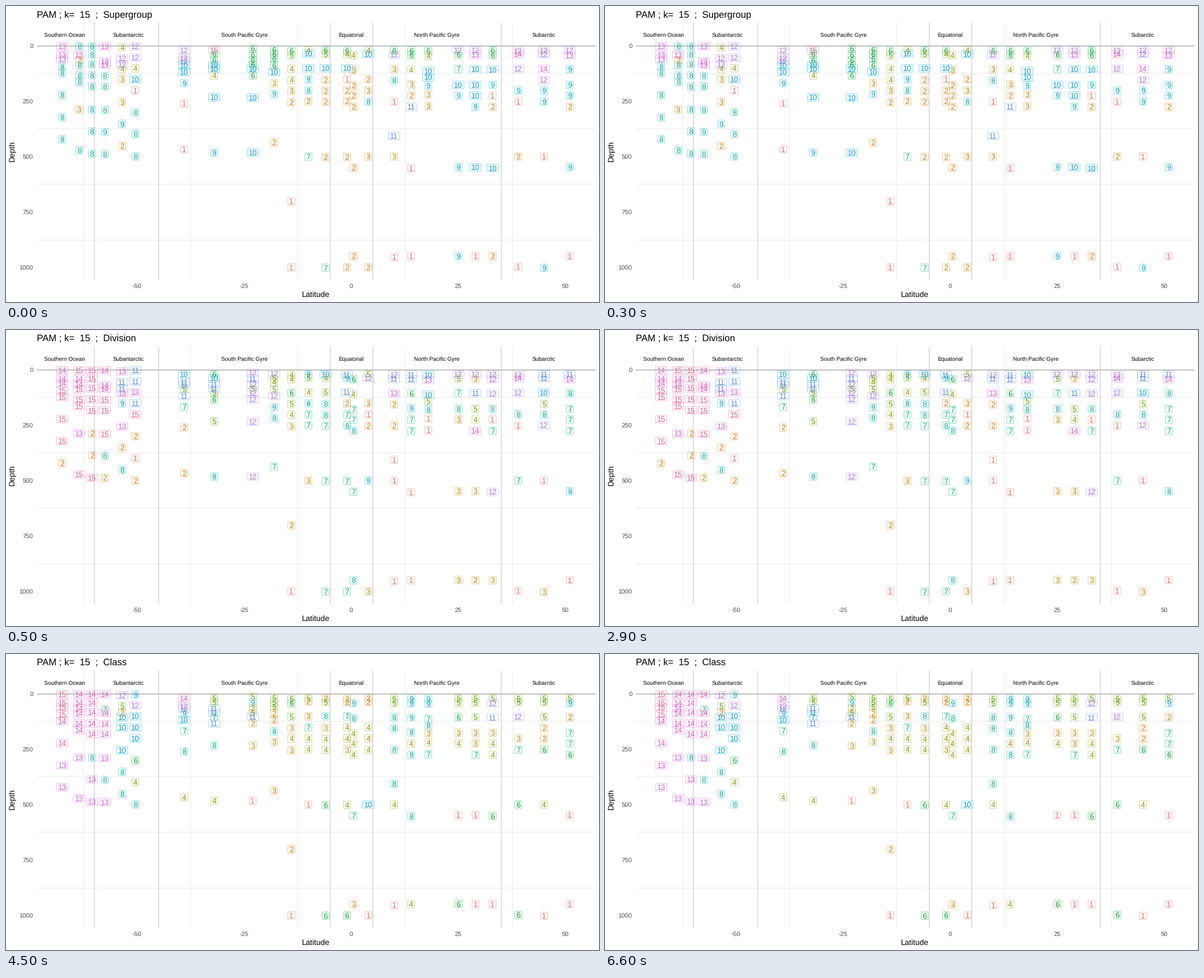
A matplotlib script for the animation above (8000 ms loop, 1058 by 529 pixels).

```python
import matplotlib.pyplot as plt
from matplotlib.animation import FuncAnimation
from matplotlib.colors import to_rgb
from matplotlib.patches import FancyBboxPatch

W, H, DPI = 1058, 529, 100
LEFT, RIGHT, TOP, BOTTOM = 55, 1051, 30, 489
LEVELS = ["Supergroup", "Division", "Class"]
HUES = ("#F8766D #E58700 #C99800 #A3A500 #6BB100 #00BA38 #00BF7D #00C0AF "
        "#00BCD8 #00B0F6 #619CFF #B983FF #E76BF3 #FD61D1 #FF67A4").split()

plt.rcParams.update({"font.family": "Liberation Sans", "text.hinting": "none"})
fig = plt.figure(figsize=(W / DPI, H / DPI), dpi=DPI, facecolor="white")
ax = fig.add_axes([0, 0, 1, 1])
ax.set(xlim=(0, W), ylim=(H, 0))
ax.axis("off")


def px(size):
    return size * 72 / DPI


def lat_x(lat):
    return 616 + 7.642 * lat


def depth_y(depth):
    return 70.5 + 0.3967 * depth


def write(x, y, s, size, color="black", ha="center"):
    """Text whose capitals are centred on y."""
    return ax.text(x, y + 0.358 * size, s, fontsize=px(size), color=color,
                   ha=ha, va="baseline")


def vline(lat, color):
    ax.plot([lat_x(lat)] * 2, [TOP, BOTTOM], color=color, lw=px(1))


def hline(depth, color):
    ax.plot([LEFT, RIGHT], [depth_y(depth)] * 2, color=color, lw=px(1))


# Grid, region borders and surface line
for d in range(125, 1000, 250):
    hline(d, "#EBEBEB")
for i in range(5):
    vline(-62.5 + 25 * i, "#EBEBEB")
for border in (-60, -45, -5, 5, 35):
    vline(border, "#C4C4C4")
hline(0, "#8C8C8C")

# Axes and region names
for d in range(0, 1001, 250):
    write(48.5, depth_y(d), str(d), 11.3, "#4D4D4D", "right")
for tick in range(-50, 51, 25):
    write(lat_x(tick), 499.5, str(tick), 11.3, "#4D4D4D")
write(553, 514.5, "Latitude", 14)
ax.text(17.5, 259, "Depth", fontsize=px(14), rotation=90,
        ha="right", va="center")
for lat, name in [(-67, "Southern Ocean"), (-52, "Subantarctic"),
                  (-25, "South Pacific Gyre"), (0, "Equatorial"),
                  (20, "North Pacific Gyre"), (45, "Subarctic")]:
    write(lat_x(lat), 51.5, name, 10)
title = write(LEFT, 14, "", 16.8, ha="left")

layers = [[], [], []]


def label(layer, x, y, cluster):
    hue = to_rgb(HUES[int(cluster) - 1])
    w, h = 4.9 + 7.6 * len(cluster), 13.4
    box = FancyBboxPatch((x - w / 2, y - h / 2), w, h,
                         boxstyle="round,pad=0,rounding_size=1.6",
                         fc="none", ec=(*hue, 0.6), lw=px(0.8))
    ax.add_patch(box)
    text = write(x, y, cluster, 13.7, [0.9 * c for c in hue])
    layer += [box, text]


def station(lat, depths, *clusters):
    """One sampling column: its depths and the clusters at each level."""
    for layer, row in zip(layers, clusters):
        for depth, cluster in zip(depths.split(), row.split()):
            label(layer, lat_x(lat), depth_y(float(depth)), cluster)


station(-67.5, "4 42 62 95 125 224 324 423",
        "13 13 13 8 8 8 8 8",
        "14 14 14 15 15 15 15 2",
        "15 15 15 15 14 14 13 13")
station(-63.5, "4 42 67 90 135 166 289 473",
        "8 13 2 8 8 8 3 8",
        "15 14 14 15 15 15 13 15",
        "14 14 14 14 14 14 13 13")
station(-60.5, "4 42 85 135 184 289 387 488",
        "8 8 8 8 8 8 8 8",
        "15 15 15 15 15 2 2 15",
        "14 14 14 14 14 8 13 13")
station(-57.5, "4 72 87 138 184 291 390 489",
        "13 13 13 8 8 8 9 8",
        "14 14 14 15 15 15 8 2",
        "14 7 14 14 14 13 8 13")
station(-53.5, "9 57 87 106 153 256 353 453",
        "4 12 12 4 3 3 9 2",
        "13 11 11 13 9 13 2 8",
        "12 5 2 10 10 10 8 8")
station(-50.4, "5 54 103 152 202 301 400 500",
        "12 12 4 10 1 8 8 8",
        "11 11 13 11 15 2 1 2",
        "9 12 10 10 10 6 4 8")
station(-39, "22 57 70 90 120 169 262 467",
        "12 12 12 10 10 9 1 1",
        "10 11 11 5 11 7 2 2",
        "14 12 12 9 10 7 8 4")
station(-32, "22 40 67 88 105 136 234 483",
        "15 6 6 10 10 4 10 9",
        "6 10 11 11 5 6 5 8",
        "5 5 11 11 7 11 8 4")
station(-23, "15 42 67 88 105 136 235 483",
        "6 6 6 6 10 6 10 10",
        "12 11 12 5 12 12 12 12",
        "5 9 2 5 11 2 3 1")
station(-18, "20 40 58 90 120 171 219 438",
        "6 6 6 6 10 3 9 2",
        "12 5 4 5 12 9 8 7",
        "5 5 5 2 2 8 3 3")
station(-14, "25 45 105 156 204 256 703 1000",
        "6 5 4 4 3 2 1 1",
        "4 4 6 5 4 3 2 1",
        "5 6 5 3 4 3 2 1")
station(-10, "22 37 103 153 203 252 501",
        "4 10 10 9 8 2 7",
        "9 5 4 8 7 7 3",
        "5 2 3 7 4 4 1")
station(-6, "22 39 103 156 205 254 503 1001",
        "6 5 10 2 2 2 2 7",
        "10 4 5 8 8 7 7 7",
        "2 5 8 3 4 4 6 6")
station(-1, "24 39 103 153 203 252 502 1000",
        "6 4 10 1 2 2 2 2",
        "11 9 11 2 7 8 7 7",
        "2 2 7 4 4 3 4 6")
station(0.5, "44 113 181 226 276 551 950",
        "4 3 2 2 2 2 2",
        "6 4 7 7 8 7 8",
        "9 8 4 4 4 7 3")
station(4, "22 39 152 203 253 501 1000",
        "4 10 2 3 8 3 2",
        "5 12 3 1 2 9 3",
        "2 2 4 4 4 10 1")
station(10, "23 43 107 158 253 407 501 954",
        "6 12 3 8 1 11 3 1",
        "12 11 13 2 2 1 1 1",
        "5 5 8 8 8 8 4 1")
station(14, "23 44 109 176 226 277 553 950",
        "6 6 4 3 2 11 1 1",
        "11 11 6 9 7 7 1 1",
        "9 9 9 8 4 8 8 4")
station(18, "24 47 114 143 179 220 274",
        "6 4 10 10 9 3 3",
        "10 13 10 5 8 1 1",
        "9 9 7 8 3 4 7")
station(25, "22 42 106 177 226 549 948",
        "12 6 7 10 9 9 9",
        "12 5 7 8 3 3 3",
        "5 5 6 3 4 1 6")
station(29, "22 42 108 178 225 277 549 950",
        "12 13 10 10 10 9 10 1",
        "12 3 11 5 4 14 3 2",
        "5 5 5 3 3 7 1 1")
station(33, "22 44 109 178 226 277 552 950",
        "6 6 10 9 1 2 10 2",
        "12 12 12 8 1 7 12 3",
        "5 12 11 3 4 4 6 1")
station(39, "25 40 105 202 253 501 998",
        "12 14 12 9 1 2 1",
        "12 14 12 8 1 7 1",
        "5 5 12 3 7 6 6")
station(45, "22 39 105 156 204 252 500 1002",
        "12 12 14 12 9 9 1 9",
        "11 11 10 5 8 12 1 3",
        "5 5 5 2 2 6 4 1")
station(51, "22 44 107 178 226 277 549 949",
        "12 13 9 9 9 2 9 1",
        "11 14 8 7 7 7 8 1",
        "5 9 2 7 7 6 1 1")


def update(i):
    t = i * 500
    level = (t >= 500) + (t >= 4500)
    title.set_text(f"PAM ; k=  15  ;  {LEVELS[level]}")
    for k, layer in enumerate(layers):
        for artist in layer:
            artist.set_visible(k == level)
    return []


anim = FuncAnimation(fig, update, frames=16, interval=500, repeat=True,
                     repeat_delay=0, init_func=lambda: update(0))
plt.show()
```
